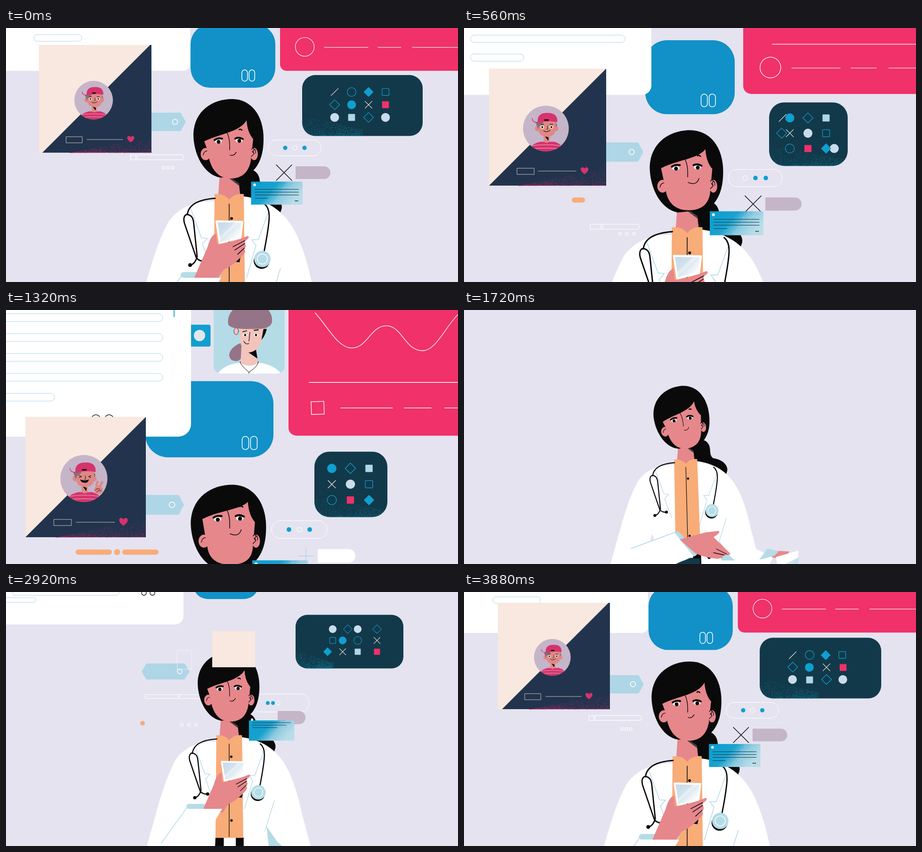
Recreate the animation shown at these times as an HTML page with a canvas. Size 960 by 540 pixels, loop 3920 ms.

```html
<!DOCTYPE html>
<html lang="en">
<head>
<meta charset="utf-8">
<title>Doctor with phone</title>
<style>
html, body { margin: 0; width: 960px; height: 540px; overflow: hidden; background: #e5e3f0; }
canvas { display: block; }
</style>
</head>
<body>
<canvas id="stage" width="960" height="540"></canvas>
<script>
const c = document.getElementById('stage').getContext('2d');
const LOOP = 3920, CUT = 1660;
const BG = '#e5e3f0', BLUE = '#1191c7', SKY = '#109fcf', PINK = '#f0316a', TEAL = '#12394a', NAVY = '#22344d',
  CREAM = '#f8e8df', MAUVE = '#c5b5c9', PALE = '#aed6e6', CUFF = '#b5dce6', SKIN = '#e6878c', ORANGE = '#f8ac78',
  INK = '#0a0a0a', WHITE = '#fff', MIST = '#c9dcec';
const POSES = [2920, 3400, 3920, 4480, 5240];
const BODY = [2280, ...POSES];
const CARD = [2920, 3400, 3880, 3920, 4480, 5240];
let now = 0;

// Timing
const ease = (a, b) => {
  const u = Math.min(1, Math.max(0, (now - a) / (b - a)));
  return u * u * (3 - 2 * u);
};
function mix(T, v) {
  const n = T.length - 1;
  const slope = i => {
    const a = Math.max(i - 1, 0), b = Math.min(i + 1, n);
    return i ? (v[b] - v[a]) / (T[b] - T[a]) : 0;
  };
  if (now <= T[0]) return v[0];
  if (now >= T[n]) return v[n] + slope(n) * (now - T[n]);
  const i = T.findIndex(t => t > now) - 1, h = T[i + 1] - T[i], u = (now - T[i]) / h, w = u * u * (3 - 2 * u);
  return v[i] * (1 - w) + v[i + 1] * w + h * u * (1 - u) * (slope(i) * (1 - u) - slope(i + 1) * u);
}
const at = (...v) => mix(POSES, v);

// Drawing
function paint(path, fill, stroke, width = 1.2) {
  if (fill) { c.fillStyle = fill; c.fill(path); }
  if (stroke) { c.strokeStyle = stroke; c.lineWidth = width; c.stroke(path); }
}
const shape = (d, ...style) => paint(new Path2D(d), ...style);
const line = (x, y, x2, y2, stroke, width) => shape(`M${x} ${y}L${x2} ${y2}`, null, stroke, width);
function oval(x, y, rx, ry, ...style) {
  const p = new Path2D();
  p.ellipse(x, y, Math.max(0, rx), Math.max(0, ry), 0, 0, 7);
  paint(p, ...style);
}
const dot = (x, y, r, ...style) => oval(x, y, r, r, ...style);
function box(x, y, w, h, r, ...style) {
  const p = new Path2D();
  p.roundRect(x, y, w, h, r);
  paint(p, ...style);
  return p;
}
function group(draw, x = 0, y = 0, s = 1, px = 0, py = 0, turn = 0) {
  c.save();
  c.translate(x, y);
  c.scale(s, s);
  c.rotate(turn);
  c.translate(-px, -py);
  draw();
  c.restore();
}
function blend(x, y, x2, y2, ...colors) {
  const g = c.createLinearGradient(x, y, x2, y2);
  colors.forEach((color, i) => g.addColorStop(i / (colors.length - 1), color));
  return g;
}
function speckle(count, color, place) {
  let seed = 7;
  const rand = () => (seed = seed * 16807 % 2147483647) / 2147483647;
  c.fillStyle = color;
  for (let i = 0; i < count; i++) c.fillRect(...place(rand(), rand()), 1, 1);
}

// Doctor
function face() {
  const look = at(0, 0, 0, -13, -22);
  shape('M455 318C420 312 398 268 398 225C400 175 440 151 480 151C520 151 547 185 547 235C547 270 538 295 515 312Z', INK);
  oval(424, 268 + look / 4, 10.5, 13, SKIN);
  oval(527, 268 + look / 4, 8, 13, SKIN);
  const brow = 241 + look, tip = 196 + look / 2, chin = 320 + look / 2;
  shape(`M421 ${brow}C455 ${brow - 17} 496 ${brow - 19} 511 ${tip}C512 ${tip + 19} 518 ${tip + 32} 525 ${tip + 40}L521 272C520 292 512 ${chin} 477 ${chin}C447 ${chin} 436 295 432 280L428 260Z`, SKIN);
  group(() => shape('M419 270Q420 262 427 261M526 257Q531 258 530 266M521 258l4 -4l2 4l-3 6l3 3l-6 6M523 262l3 2', null, INK, 1.3), 0, look / 4);
  group(() => {
    for (const [x, y] of [[451, 241], [495, 239]]) {
      oval(x, y, 7.5, 4.5, WHITE);
      oval(x + 0.5, y + 1, 4, 4, INK);
    }
    shape('M443 238Q450 233 459 235M487 235Q494 231 503 236', null, INK, 4);
    shape('M495 216Q498 214 501 217', null, INK, 2.5);
    shape('M469 222Q476 234 475 259', null, INK, 1.4);
    const smirk = ease(4000, 4480) * 9;
    shape(`M476 270Q${484 + smirk} ${273 + smirk / 2} ${489 + smirk} ${264 - smirk / 4}`, null, INK, 1.4);
  }, 0, look);
}

function torso() {
  shape('M270 640L298 540C318 470 328 445 345 412C365 384 395 371 425 369L443 368L505 358C560 365 595 395 615 435C635 475 645 520 649 540L677 645Z', WHITE);
  shape('M454 308L475 320L495 333L499 368H450Z', SKIN);
  shape('M473 319L482 321L495 330L496 336Z', '#443b3d');
  group(() => {
    shape('M441 600H461V640H439ZM490 600H509V640H490Z', INK);
    shape('M443 353Q463 351 474 365Q485 351 505 353L508 601H441Z', ORANGE);
    line(474, 374, 474, 598, INK, 1.5);
    dot(479, 405, 3, INK);
    dot(479.5, 559, 3, INK);
  }, 474, 365, 1, 474, 365, mix(BODY, [-.025, 0, 0, 0, 0, 0]));
  shape('M392 383L415 446L428 447L417 459L436 510M557 392L536 450L522 450L531 462L511 531M583 511L560 585', null, PALE, 1.4);
  shape('M564 573L590 610L606 625H570Z', CUFF);
  shape('M444 362C400 365 387 380 385 397M404 488L379 415C375 400 382 394 388 397C397 400 398 408 399 418L406 486C404 495 398 503 391 504M404 488Q410 496 420 495', null, INK, 2.8);
  dot(391, 504, 4, INK);
  dot(422, 495, 4, INK);
  shape('M549 374Q559 382 559 400Q559 420 548 476', null, INK, 2.8);
  dot(543, 495, 17, INK);
  dot(544.5, 491, 17.5, CUFF);
  dot(544.5, 491, 10.8, null, WHITE, 1.4);
}

function raisedArm() {
  const drop = 1 - ease(2540, 2860), settle = 1 - ease(2920, 3400);
  box(371, 519, 86, 12, 6, CUFF);
  group(() => {
    shape('M485 497L496 498L501 472Z', INK);
    shape('M447 411L502 412L498 446L454 457Z', blend(450, 412, 490, 450, '#c4d9e8', '#d5e3ee', WHITE), WHITE, 4);
    shape('M452 446L485 414L496 414L453 453Z', 'rgba(255,255,255,.35)');
    shape('M399 533L428 466Q435 440 446 437L449 460Q482 456 513 442Q520 444 508 453L507 458Q512 464 506 470Q511 475 503 483L497 489Q478 508 462 514L450 533Z', SKIN);
    shape('M482 465L507 452M486 472L507 458M492 481L506 468', null, INK, 1.5);
  }, settle * 9 + drop * 12, settle * 6 + drop * 60);
  shape('M375 531H457L441 558L420 606L310 616Z', WHITE);
  line(372, 528, 310, 614, PALE, 1.5);
}

// Arms held low, laid out at the size of the opening pose.
function loweredArms() {
  shape('M450 540L480 527H501V545H445Z', TEAL);
  shape('M488 519H500V528H486ZM515 524H530L520 530Z', INK);
  shape('M395 490L400 476L404 489Z', BG);
  shape('M350 508L450 472L491 522L445 542H345Z', WHITE);
  line(355, 507, 450, 472, PALE, 1.5);
  group(() => {
    shape('M570 520L612 515L625 560L580 575Z', WHITE);
    shape('M540 500L558 498L572 522L560 530Z', SKIN);
    shape('M527 485L560 465L579 503L566 516Z', WHITE);
    shape('M538 476L560 465L575 496Z', blend(545, 470, 568, 490, '#c4d9e8', '#dfe9f1'));
    shape('M553 518L566 520L592 541H562Z', CUFF);
  }, 612, 545, 1, 612, 545, 2.2 * (1 - ease(1760, 2240)));
  shape('M447 473Q452 469 457 472L495 516Q496 522 488 524Z', CUFF);
  group(() => {
    shape('M458 488L512 473L541 469.500Q546 473 530 483L566 518Q564 523 552 520L549 527L538 529Q505 525 490 516Z', SKIN);
    shape('M536 508L558 519M530 516L553 521', null, INK, 1.3);
  }, 470, 490, 1, 470, 490, -0.5 * ease(2290, 2540));
}

function doctor() {
  const s = mix(BODY, [.79, .88, .946, 1, 1.047, 1.074]);
  const y = mix(BODY, [327, 315, 325, 365, 436, 598]);
  group(() => {
    shape('M473 319C490 300 515 296 528 304C547 318 533 340 548 350C575 353 590 372 585 386L582 394C560 385 530 372 496 362Z', INK);
    torso();
    if (now < 2540) group(loweredArms, 474, 365, 1 / .79, 471, 327);
    else raisedArm();
    group(face, mix(BODY, [476, 474, 474, 474, 474, 474]), 335 + mix(BODY, [4, 0, 0, 0, 5, 3]), 1, 474, 335, mix(BODY, [-.12, 0, 0, 0, 0, 0]));
  }, mix(BODY, [471, 474, 474, 474, 474, 474]), y, s, 474, 365);
}

// Panels along the top
function portrait() {
  group(() => {
    box(378, 31, 56.500, 46.500, 4, SKY);
    dot(411, 54, 12, '#e4e6ee');
    c.save();
    c.clip(box(441, -60, 151, 195, 16, CUFF));
    shape('M540 40L554 40Q548 62 538 66Z', INK);
    shape('M498 70Q475 80 474 96Q476 110 492 108Q504 104 503 84Z', '#967487');
    shape('M500 78L498 118H535L532 80Z', '#f2c4bc');
    shape('M515 90L531 84L534 103Z', INK);
    shape('M496 34H548L541 72Q530 90 514 90Q500 86 497 62Z', '#f2c4bc');
    oval(489, 45, 5, 7, '#f2c4bc', INK, .8);
    shape('M472 30C468 5 490 -15 520 -14C552 -15 567 5 565 25C562 39 545 41 520 40C495 41 474 38 472 30Z', '#967487');
    shape('M503 46L511 44M527 43L536 42', null, INK, 1.8);
    for (const x of [508, 531]) { oval(x, 53, 5, 2.500, WHITE); dot(x, 53, 2.300, INK); }
    shape('M518 47L516 66M505 66Q509 74 516 71', null, INK, 1.2);
    shape('M448 136Q466 114 497 112Q516 124 538 112Q570 116 585 136Z', WHITE);
    shape('M497 109Q497 116 516 132Q537 118 536 109M516 132V136', null, INK, 1);
    c.restore();
  }, 0, at(-300, -300, -300, -190, 0));
}

function blueCard() {
  const x = at(397, 387, 392, 385, 296), right = at(537, 547, 572, 575, 568);
  const top = at(-125, -75, -8, 26, 151), bottom = at(15, 80, 127, 183, 313);
  box(x, top, right - x, bottom - top, at(32, 38, 42, 46, 48), BLUE);
  if (now < 3100) return;
  const p = ease(3400, 3680), s = at(1, 1, 1, 1.12, 1.17), px = at(501, 501, 501, 503.500, 501.500);
  box(384 + (px - 384) * p, 46 + (bottom - 38 * s - 46) * p, 28 + (12 * s - 28) * p, 21 + (24 * s - 21) * p, 9 - 2 * p, null, WHITE, 1.5);
  box(512 + (px + 15.300 * s - 512) * p, 33 + (bottom - 38 * s - 33) * p, 9.500 + (12 * s - 9.500) * p, 34 + (24 * s - 34) * p, 6, null, WHITE, 1.5);
}

function whitePanel() {
  const right = at(377, 387, 391, 398, 393), bottom = at(69, 38, 91, 142, 269);
  box(-60, -60, right + 60, bottom + 60, at(18, 10, 14, 20, 27), WHITE);
  const left = at(14, 66, 59, 14, -30), gap = at(15, 30, 36, 40, 42.300), y = bottom - at(57, 74, 77, 87, 92);
  const h = at(10, 13, 14, 15.500, 16.500);
  box(at(-40, 66, 59, 14, -30), y, at(104, 102, 102, 113, 133), h, h / 2, null, PALE, 1);
  for (let i = 1; i < 6; i++) box(left, y - gap * i, at(240, 320, 340, 342, 333) - left, h, h / 2, null, PALE, 1);
  const cx = at(293, 268, 250, 220, 191), cy = bottom - at(67, 29, 30, 35, 37);
  for (const dx of [0, at(18, 20.500, 22, 25, 28)]) dot(cx + dx, cy, at(5, 7, 8, 9, 9.500), null, INK, 1.3);
  line(357, bottom - 310, 357, bottom - 255, SKY, 1.8);
}

function pinkPanel() {
  const left = at(580, 580, 582, 593, 600), bottom = mix(CARD, [-60, 1, 86, 91, 140, 267]);
  box(left, bottom - 500, 500, 500, at(13, 13, 14, 17, 17), PINK);
  group(() => {
    const q = ease(4600, 5000), r = 20 - 8.500 * q;
    group(() => box(-r, -r, 2 * r, 2 * r, r * (1 - q), null, CREAM, 1.3), 52.500, -51 + q, 1, 0, 0, -.03 * q);
    for (const [a, b] of [[94, 187], [208, 257], [281, 420]]) line(a, -50, b, -50, CREAM, 1.3);
    line(at(60, 60, 60, 56, 37), -96, 420, -96, CREAM, 1.3);
    shape('M48 -221C70 -198 88 -158 114 -158C142 -158 148 -198 176 -198C204 -198 210 -153 241 -153C266 -153 283 -198 306 -219', null, CREAM, 1.3);
  }, left, bottom, at(1, 1, 1, 1.1, 1.18));
}

// Icon grid: each slot is row * 5 + column + 1
const ICONS = [
  ['circle', MIST, 1.34, 1, 11, 7, 7], ['circle', MIST, 3, 3, 14, 13.450, 0], ['diamond', 0, 2.34, 2, 6, 5.550, 0],
  ['diamond', 0, 4.28, 4, 13, 2, 2], ['square', 0, 6.34, 6, 4, 8, 8], ['circle', SKY, 7, 7, 7, 1, 1],
  ['circle', 0, 8, 8, 2, 11, 11], ['cross', 0, 9.28, 9, 8, 6, 6], ['slash', 0, 12, 12, 1, .6, 0],
  ['diamond', SKY, 11, 11, 3, 13, 13], ['square', PALE, 13, 13, 12, 3, 3], ['square', PINK, 14.28, 14, 9, 12, 12]
];
function icon([kind, fill, ...slots], x0, dx, y0, dy, size) {
  let i = Math.max(0, Math.min(3, POSES.findIndex(t => t > now) - 1));
  if (now >= 5240) i = 3;
  const p = ease(POSES[i], POSES[i + 1]), gone = !slots[4];
  const from = slots[i], to = slots[i + 1] || from;
  const blendTo = f => f(from) + (f(to) - f(from)) * p;
  const col = blendTo(v => v % 5 - 1), row = blendTo(v => Math.floor(v / 5));
  const s = size * (gone ? 1 - ease(4480, 4720) : 1);
  const style = fill ? [fill] : [null, SKY, 1.2];
  group(() => {
    if (kind === 'circle') dot(0, 0, 9.300, ...style);
    if (kind === 'square') box(-7.300, -7.300, 14.600, 14.600, 1, ...style);
    if (kind === 'diamond') shape('M0 -10.500L10.500 0L0 10.500L-10.500 0Z', ...style);
    if (kind === 'cross') line(-7.500, -7.500, 7.500, 7.500, CREAM);
    if (kind === 'cross' || kind === 'slash') line(-7.500, 7.500, 7.500, -7.500, CREAM);
    if (kind === 'slash') { const k = 7.500 * (1 - ease(3400, 3700)); line(-k, -k, k, k, CREAM); }
  }, x0 + col * dx, y0 + row * dy, s);
}
function iconCard() {
  const x = at(615, 620, 629, 648, 655), y = at(48.500, 78, 100, 158, 301);
  const w = at(229, 241, 256, 167, 155), h = at(114, 121, 129.500, 135, 139);
  c.save();
  c.clip(box(x, y, w, h, at(25, 27, 28, 32, 32), TEAL));
  const spread = at(.35, .4, .5, .95, 1);
  speckle(1100, 'rgba(17,150,175,.5)', (a, b) => [x + w * a * spread, y + h - h * .35 * b * b * b * (1 - .7 * a)]);
  c.restore();
  const grid = [at(683, 685.500, 698, 692, 692), at(32, 34, 36, 38.500, 39.500), at(79, 114, 136, 191, 336.500),
    at(24, 24.500, 27, 32.500, 33.700), at(.88, .94, 1, 1.03, 1.06)];
  ICONS.forEach(i => icon(i, ...grid));
}

// Small pieces around the head
function smallPieces() {
  const ox = at(290, 270, 252, 243, 236), oy = mix(CARD, [279, 170, 240, 261, 365.500, 514.500]);
  const len = at(0, 0, 0, 14, 88), gap = at(0, 0, 0, 0, 11);
  if (len > 1) for (const x of [ox - len, ox + gap]) box(x, oy - 5.500, len - gap, 11, 5.500, ORANGE);
  dot(ox, oy, at(5, 5, 5.500, 6, 6.500), ORANGE);

  const l = at(288, 210, 200, 180, 160), r = at(390, 377, 382, 381, 378), y = at(152, 151, 180, 243, 393), h = at(34, 37, 39, 41, 42);
  shape(`M${l} ${y + h / 2}l10 ${-h / 2}H${r - 11}L${r} ${y + h / 2}l-11 ${h / 2}H${l + 10}Z`, PALE);
  dot(at(369, 355, 359, 356, 352.500), y + h / 2, at(5, 5.200, 5.500, 5.700, 6), null, WHITE, 1.5);

  const by = at(218, 219, 269.500, 417, 600), bx = at(296, 279, 265, 268, 271), bw = at(70, 13, 10.500, 23, 30);
  box(bx, by, bw, at(8.500, 10, 10.500, 10.500, 11), 0, null, WHITE, 1.2);
  box(bx + bw + 3, by, at(430, 386, 377, 372, 368) - bx - bw - 3, at(8.500, 10, 10.500, 10.500, 11), [0, 5, 5, 0], null, WHITE, 1.2);
  for (let i = 0; i < 3; i++) dot(at(373, 343, 335, 331, 328) + i * at(15.500, 9, 9.500, 15, 18), at(282, 268.500, 297, 437, 620), 3, null, WHITE, 1.1);

  const px = at(522, 553, 557, 561, 564), py = at(217, 211, 238, 300.500, 447.500), ph = at(38, 30.500, 33.500, 36.500, 38);
  box(px, py, at(122, 105, 112, 115, 118), ph, ph / 2, null, WHITE, 1);
  const dx = at(556, 585, 593, 597, 601), step = at(11, 20, 20.500, 22, 22);
  const spot = (...slots) => dx + step * Math.max(0, Math.min(2, at(...slots)));
  const size = at(4, 4.200, 4.600, 4.800, 5);
  dot(spot(0, 1, 0, 1, 0), py + ph / 2, size, SKY);
  dot(spot(1, 2, 2, 2, 2), py + ph / 2, size, SKY);
  dot(spot(2, 0, 1, 0, 1), py + ph / 2, size, null, WHITE, 1.1);

  const mx = at(577, 584, 615, 640, 662), my = at(253, 261, 294, 360, 508), mh = at(28, 26, 27, 28, 29), late = now > 4860;
  box(mx, my, at(59, 70, 74, 77, 80), mh, [0, mh / 2, mh / 2, 0], late ? WHITE : MAUVE);
  const arm = at(0, 17.500, 23.300, 24.500, 15.500);
  if (arm > 1) group(() => {
    line(-arm, 0, arm, 0, late ? PALE : INK, 1.4);
    line(0, -arm, 0, arm, late ? PALE : INK, 1.4);
  }, at(560, 557.500, 590.500, 614, 637), my + mh / 2, 1, 0, 0, Math.PI / 4 * (1 - ease(4600, 5100)));
}

function messageCard() {
  const x = at(516, 518, 520.500, 522, 523), y = at(273, 294, 326.500, 389.500, 532), s = at(.88, .94, 1, 1.04, 1.08);
  const unfold = ease(2920, 3250), tuck = 11 * (1 - unfold);
  group(() => {
    c.fillStyle = blend(25, 0, 82, 52, SKY, '#1aa2cf', '#8ccae0', '#b9dde8');
    c.fillRect(0, 0, 109.500, 49);
    speckle(500, 'rgba(190,224,234,.5)', (a, b) => [Math.min(108, 45 + 40 * a + 30 * (1 - b)), b * 48]);
    dot(7.500, 7 - tuck * .8, 3, CREAM);
    for (const [ly, lx] of [[16.500, 101], [22.500, 101 - tuck], [28.500, 101 - 3 * tuck], [35.500, 8.500 + 26.500 * unfold]]) {
      if (lx > 9) line(8.500, ly - tuck, lx, ly - tuck, '#14394a', 1);
    }
    if (unfold > .5) for (const dx of [94, 96.500, 99]) dot(dx, 41, 1, INK);
  }, x, y, s);
}

// Profile card; the avatar is laid out on a radius of 50
function avatar() {
  c.save();
  const clip = new Path2D();
  clip.arc(0, 0, 50, 0, 7);
  paint(clip, MAUVE);
  c.clip(clip);
  shape('M-40 50Q-34 34 -12 29H18Q36 34 42 50Z', '#d6336c');
  shape('M-34 38Q0 33 36 38M-34 45Q0 41 38 45', null, '#f0b5c5', 1);
  shape('M-5 12H8V29Q2 34 -5 29Z', '#df8885');
  shape('M-3 16L6 20L5 27Z', INK);
  for (const x of [-19, 22]) oval(x, 0, 5, 6, '#df8885');
  shape('M-18 -18H23L21 6Q17 18 3 18Q-12 18 -16 6Z', '#df8885');
  shape('M-23 -14L-4 -16Q-8 -7 -15 -5L-17 2Z', '#8a6d7a');
  shape('M21 -14L25 -7L22 -3Z', '#8a6d7a');
  shape('M-18 -15C-19 -30 -8 -35 5 -34C20 -34 26 -26 25 -14Q4 -18 -18 -12Z', '#d6336c');
  shape('M-18 -13Q-29 -13 -30 -22', null, '#d6336c', 1.5);
  box(-4, -20, 10, 3, 1, INK);
  const happy = now > 4850;
  shape(happy ? 'M-10 -6l5 2l-5 2M15 -6l-5 2l5 2' : 'M-11 -9h6M9 -9h6', null, INK, 1.2);
  if (!happy) for (const x of [-8, 12]) { oval(x, -3, 4, 3.500, CREAM); dot(x, -3, 2, INK); }
  shape('M3 -6L4 1L1 2', null, INK, .9);
  if (happy) shape('M-8 2Q2 6 11 2Q8 10 2 9Q-6 9 -8 2Z', INK);
  else shape('M-5 5Q2 10 9 4', null, INK, 1.1);
  group(() => {
    shape('M27 14L29 7M32 20L39 8', null, '#df8885', 5);
    dot(31, 24, 9, '#df8885');
    shape('M24 25Q28 19 34 23M27 29Q31 24 37 26', null, INK, .9);
  }, 0, 55 * (1 - ease(4750, 5050)));
  c.restore();
}

function profileCard() {
  const x = at(438, 121, 70, 53, 41), y = mix(CARD, [83, 29, 23, 36, 86, 227]);
  const w = mix(CARD, [91, 216, 238, 239, 249, 256]), h = mix(CARD, [77, 108, 226, 229, 249, 256]);
  const cut = Math.max(0, mix(CARD, [0, 71, 229, 232, 249, 256])), r = x + w, b = y + h;
  c.save();
  const frame = new Path2D();
  frame.rect(x, y, w, h);
  paint(frame, CREAM);
  c.clip(frame);
  shape(`M${r} ${b - cut}V${b}H${r - cut}Z`, NAVY);
  if (cut > 150) speckle(1300, 'rgba(190,40,105,.55)', (a, k) => [r - cut * .75 * a, b - h * .15 * k * k * k * (1 - a)]);
  c.restore();

  const bx = at(364, 158, 128, 113, 102), by = mix(CARD, [124, 147, 216, 231, 298, 445]), bh = at(40, 11, 13, 13, 13);
  const ink = now < 3600 ? 'rgba(255,255,255,.6)' : '#cdb9b9';
  box(bx, by, at(30, 32, 34, 36, 37), bh, 0, null, ink, 1);
  const pop = ease(3440, 3760), ly = by + bh / 2 - .5;
  if (now > 3200) line(at(200, 200, 172, 158, 149), ly, at(200, 264, 248, 238, 231), ly, ink, 1);
  if (!pop) return;
  group(avatar, x + w * .486, y + h * .512, mix(CARD, [0, .68, .78, .82, .97, 1]) * pop);
  group(() => shape('M0 7C-4 4 -7.500 1 -7.500 -3C-7 -8 -2 -7.500 0 -4C2 -7.500 7 -8 7.500 -3C7.500 1 4 4 0 7Z', '#d6336c'),
    at(270, 268, 265, 256, 249.500), ly - 1, at(.8, .9, 1, 1.08, 1.22) * pop);
}

function render(ms) {
  const t = ms % LOOP;
  now = t < CUT ? t + LOOP : t;
  c.fillStyle = BG;
  c.fillRect(0, 0, 960, 540);
  const open = ease(2440, 2840);
  const fan = draw => open && group(draw, 482, 380, open, 482, 380);
  if (open) {
    group(() => {
      portrait();
      blueCard();
      whitePanel();
      pinkPanel();
    }, 0, -130 * (1 - open));
    fan(iconCard);
    fan(smallPieces);
  }
  doctor();
  fan(messageCard);
  fan(profileCard);
  const fly = ease(2000, 2280);
  if (fly && now < 2320) group(() => line(-6, -5, 6, 6, 'rgba(255,255,255,.25)', 1.2), 640 + 298 * fly, 420 - 262 * fly);
}

c.lineCap = c.lineJoin = 'round';
const start = performance.now();
function tick() {
  render(performance.now() - start);
  requestAnimationFrame(tick);
}
tick();
</script>
</body>
</html>
```
